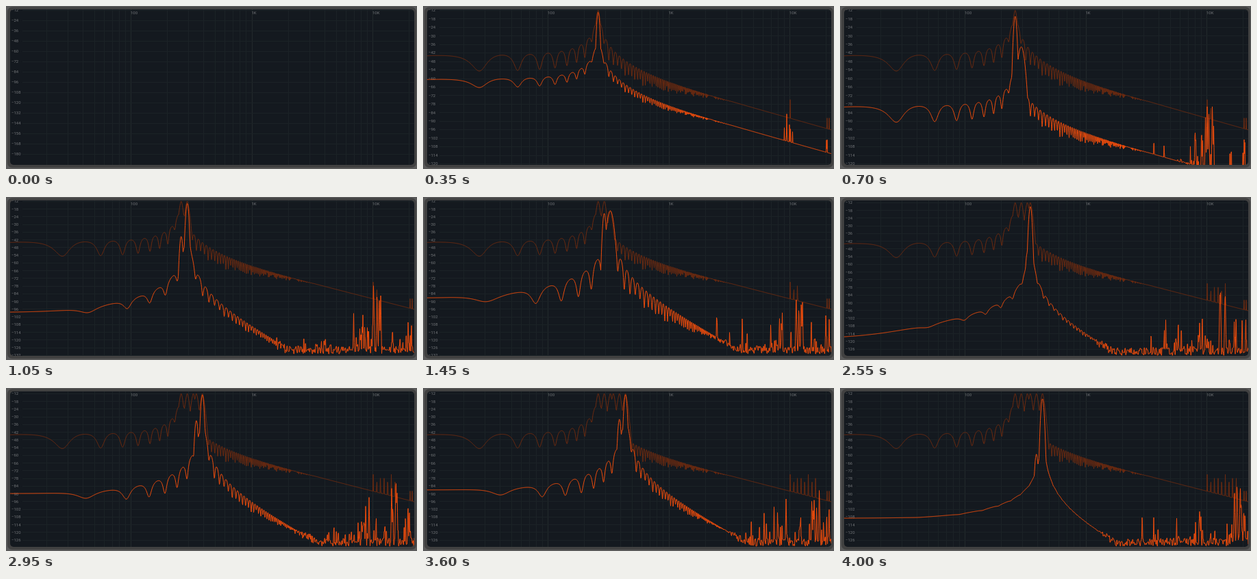
Write an HTML page with a canvas that moves like this. It is 600 by 238 pixels and loops after 4.05 s.

```html
<!DOCTYPE html>
<html>
<head>
<meta charset="utf-8">
<style>
html, body { margin: 0; width: 100%; height: 100%; overflow: hidden; background: #4b4b4b; }
canvas { display: block; }
</style>
</head>
<body>
<canvas id="c" width="600" height="238"></canvas>
<script>
const ctx = document.getElementById('c').getContext('2d');
const LOOP = 4050, STEP = 50, BEAT = 665, FIRST = 45, DECADE = 176.5, FLOOR = -128;
const clamp = (v, a = 0, b = 1) => Math.min(b, Math.max(a, v));
const lerp = (a, b, k) => a + (b - a) * k;
const ramp = (v, a, b) => clamp((v - a) / (b - a));
const gain = v => 20 * Math.log10(v);
const freqX = f => 182 + DECADE * Math.log10(f / 100);
const xFreq = x => 100 * 10 ** ((x - 182) / DECADE);
const rnd = (a, b) => {
  const s = Math.sin(a * 127.1 + b * 311.7) * 43758.5453;
  return s - Math.floor(s);
};

// Each note starts with a click: level in dB at 0 Hz, tilt towards high frequencies
const click = (freq, level, tilt, slope = 1.85, gap = 50, depth = 20) =>
  ({ freq, level, tilt, slope, gap, depth, x: freqX(freq) });
const notes = [
  click(261.6, -44, 0.5, 1.1, 29.3, 11),
  click(293.7, -80, 7),
  click(329.6, -83.4, 7),
  click(349.2, -90, 22),
  click(392, -76.5, 4.5),
  click(440, -74.5, 4.5)
];
const age = (n, t) => t - FIRST - n * BEAT;

// Leakage of a sine that starts abruptly, with interference lobes
function skirt(note, x, ripple) {
  const f = xFreq(x), r = f / note.freq, off = Math.abs(r * r - 1);
  const u = (f - note.freq) / note.gap;
  const dip = (1 / (1 + 3 * Math.sin(Math.PI * u) ** 2) - 0.25) / 0.75;
  const left = note.tilt < 1 ? 1 : ramp(x, 40, 240);
  const right = ramp(x, 450, 290) * (0.7 + 0.5 * rnd(Math.round(u), 3));
  const depth = note.depth * ripple * (r < 1 ? left : right) * ramp(off, 0.12, 0.3);
  return note.level + gain(Math.hypot(1, note.tilt * r))
    - note.slope * gain(Math.max(off, 0.12)) - depth * dip;
}

const attack = a => a < -20 ? -200 : lerp(-40, -12, ramp(a, -20, 110));

function peak(n, x, t) {
  const a = age(n, t), width = lerp(0.42, 1.8, ramp(a, 110, 230));
  const fade = 0.008 * Math.max(0, a - 110) + 0.06 * Math.max(0, a - BEAT);
  return attack(a) - fade - width * (x - notes[n].x) ** 2;
}

const drift = t => 530 + t * 0.0122;

// Groups of random spikes: count, centre, spread, strongest and weakest level
function liveSpikes(t) {
  const list = [];
  const group = (count, x, spread, hi, lo) => {
    for (let i = 0; i < count; i++) {
      const k = list.length;
      list.push([x + (rnd(k, t + 1) - 0.5) * spread, lerp(hi, lo, rnd(k, t + 2))]);
    }
  };
  group(5, drift(t), 14, -75, -98);
  group(4, 524, 13, -92, -112);
  group(2, 590, 6, -97, -104);
  group(8, 510, 170, -98, -118);
  return list;
}

function heldSpikes(t) {
  const list = [[590, -88], [593, -88]];
  for (let x = 536; x < drift(t) + 3; x += 5.3) list.push([x, -75]);
  return list;
}

const withSpikes = (db, list, x) => list.reduce((top, [sx, level]) => {
  const d = Math.abs(x - sx);
  return d < 1.6 ? Math.max(top, level - d * 30) : top;
}, db);

function current(x, t, n, spikes) {
  const a = age(n, t), arriving = age(n + 1, t) > -20 && n < 5;
  const ripple = arriving ? 1 : clamp(1 - a / 650);
  let db = Math.max(FLOOR, skirt(notes[n], x, ripple) - 0.055 * a);
  notes.forEach((_, i) => db = Math.max(db, peak(i, x, t)));
  const px = Math.floor(x), quiet = ramp(db, -118, -124);
  const burst = rnd(px + 700, t) ** 10 * (x > 460 ? 14 : 4);
  return withSpikes(db + quiet * ((rnd(px, t) - 0.5) * 6 + burst), spikes, x);
}

function held(x, t, spikes) {
  let db = skirt(notes[0], x, 1);
  notes.forEach((note, n) =>
    db = Math.max(db, attack(age(n, t)) - 1.5 * Math.abs(x - note.x) ** 1.5));
  // The very first click already reaches full height
  db = Math.max(db, -12 - 1.5 * Math.abs(x - notes[0].x) ** 1.5);
  return withSpikes(db, spikes, x);
}

function trace(fn, color, toY) {
  ctx.beginPath();
  for (let x = 6; x <= 596; x += 0.5) ctx.lineTo(x, toY(fn(x)));
  ctx.strokeStyle = color;
  ctx.stroke();
}

function panel(x, y, w, h, r, color) {
  ctx.beginPath();
  ctx.roundRect(x, y, w, h, r);
  ctx.fillStyle = color;
  ctx.fill();
}

function line(x0, y0, x1, y1, color) {
  ctx.beginPath();
  ctx.moveTo(x0, y0);
  ctx.lineTo(x1, y1);
  ctx.strokeStyle = color;
  ctx.stroke();
}

function grid(scale, toY) {
  for (const base of [10, 100, 1000, 10000])
    for (let m = 1; m < 10; m++) {
      const x = Math.round(freqX(base * m)) + 0.5;
      if (x > 20 && x < 596) line(x, 5, x, 232, m == 1 ? '#22292c' : '#1b2226');
    }
  ctx.fillStyle = '#737679';
  for (let db = -12; toY(db) < 231; db -= scale < 1.6 ? 12 : 6) {
    const y = Math.round(toY(db)) + 0.5;
    line(24, y, 596, y, '#1b2226');
    ctx.fillText('\u2212' + -db, 8, toY(db) + 0.5);
  }
  ['100', '1K', '10K'].forEach((label, i) => ctx.fillText(label, freqX(100 * 10 ** i), 10.5));
}

function draw(t) {
  const scale = lerp(1.25, 2.074, ramp(t, 0, 350)) - 0.199 * ramp(t, 700, 1000);
  const top = 6 + 2 * ramp(t, 1450, 2150);
  const toY = db => top + (-12 - db) * scale;
  ctx.fillStyle = '#5a5a5a';
  ctx.fillRect(0, 0, 600, 238);
  panel(2, 1.5, 597, 234.5, 7, '#414141');
  panel(6, 5, 590, 227, 5, '#14191f');
  ctx.save();
  ctx.clip();
  ctx.lineWidth = 1;
  ctx.font = '6px Roboto, sans-serif';
  ctx.textBaseline = 'middle';
  grid(scale, toY);
  if (t > FIRST) {
    const n = clamp(Math.floor((t - FIRST) / BEAT), 0, 5);
    const kept = heldSpikes(t), live = liveSpikes(t);
    trace(x => held(x, t, kept), '#6c2a10', toY);
    trace(x => current(x, t, n, live), '#ee4c0c', toY);
  }
  ctx.restore();
}

const start = performance.now();
function tick() {
  const t = (performance.now() - start) % LOOP;
  draw(Math.floor(t / STEP) * STEP);
  requestAnimationFrame(tick);
}
tick();
</script>
</body>
</html>
```
